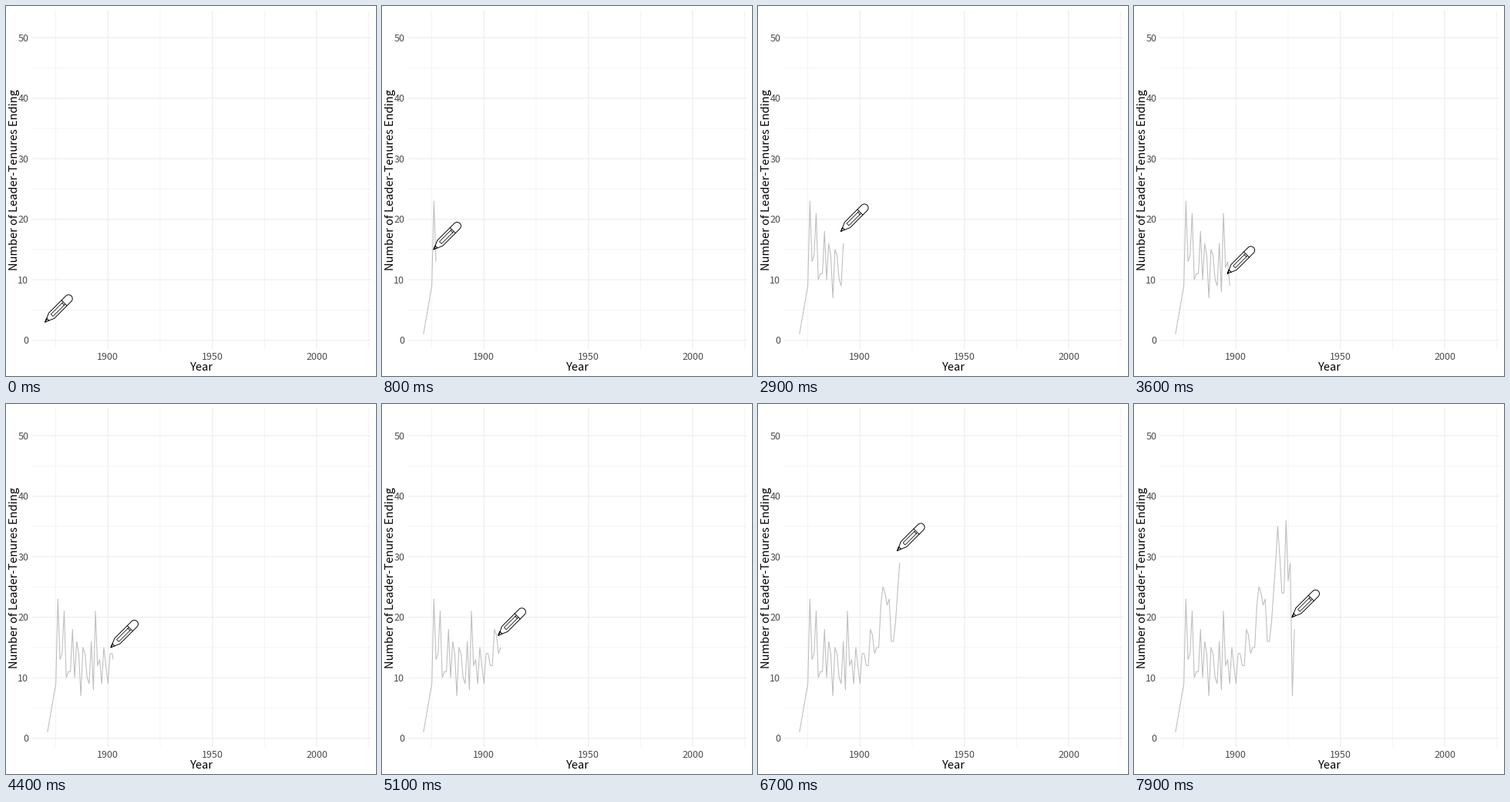
A matplotlib script for the animation above (8000 ms loop, 480 by 480 pixels).

```python
import numpy as np
import matplotlib.pyplot as plt
from matplotlib.animation import FuncAnimation
from matplotlib.path import Path
from matplotlib.patches import PathPatch
from matplotlib.transforms import Affine2D

plt.rcParams["font.family"] = "Noto Sans CJK JP"
plt.rcParams["path.snap"] = False

SIZE, DPI = 480, 100
PX = 72 / DPI  # points per pixel
FRAMES, INTERVAL = 80, 100
LEFT, RIGHT, TOP, BOTTOM = 34.5, 474.5, 5.5, 445.5

years = np.r_[1871, np.arange(1875, 1930)]
counts = np.array([
    1, 9, 23, 13, 14, 21, 10, 11, 11, 18, 10, 16, 14, 7, 15, 14, 10, 9, 16,
    8, 21, 12, 13, 9, 15, 12, 9, 14, 14, 12, 12, 18, 17, 14, 15, 15, 22, 25,
    24, 22, 23, 16, 16, 19, 24, 29, 35, 30, 24, 24, 36, 26, 29, 7, 18, 18])


def sx(year):
    return 132.3 + 2.707 * (year - 1900)


def sy(count):
    return 433.6 - 7.85 * count


# Every data point lands on a whole frame; 1871-2014 spans 199 steps.
keys = np.round((years - 1871) * 199 / 143)
px, py = sx(years), sy(counts)

fig = plt.figure(figsize=(SIZE / DPI, SIZE / DPI), dpi=DPI, facecolor="white")
ax = fig.add_axes([0, 0, 1, 1])
ax.set_xlim(0, SIZE)
ax.set_ylim(SIZE, 0)
ax.axis("off")


def rule(xs, ys, width):
    ax.plot(xs, ys, color="#EBEBEB", lw=width * PX,
            solid_capstyle="butt", zorder=1)


def label(x, y, text, size, color, **kw):
    ax.text(x, y, text, fontsize=size * PX, color=color, va="baseline",
            rotation_mode="anchor", zorder=2, **kw)


for year in range(1875, 2026, 25):
    major = year % 50 == 0
    rule([sx(year)] * 2, [TOP, BOTTOM], 1.07 if major else 0.53)
    if major:
        label(sx(year), 459, str(year), 12.5, "#4D4D4D", ha="center")

for count in range(0, 51, 5):
    major = count % 10 == 0
    rule([LEFT, RIGHT], [sy(count)] * 2, 1.07 if major else 0.53)
    if major:
        label(29.3, sy(count) + 4.5, str(count), 12.5, "#4D4D4D", ha="right")

label(254, 472.8, "Year", 14.6, "black", ha="center")
label(15.3, 225, "Number of Leader-Tenures Ending", 14.6, "black",
      ha="center", rotation=90)

trace, = ax.plot([], [], color="#BEBEBE", lw=1.07 * PX, zorder=3,
                 solid_capstyle="butt", solid_joinstyle="round")

# Pencil in its own frame: tip at the origin, axis along +x.
M, L, C = Path.MOVETO, Path.LINETO, Path.CURVE4
W, END = 5.0, 48.0
R = W * 0.55


def strokes(*lines):
    verts = [p for line in lines for p in line]
    codes = [c for line in lines for c in [M] + [L] * (len(line) - 1)]
    return Path(verts, codes)


outline = Path(
    [(4.8, -2), (11.7, -W), (END - W, -W),
     (END - W + R, -W), (END, -R), (END, 0),
     (END, R), (END - W + R, W), (END - W, W),
     (11.7, W), (4.8, 2)],
    [M, L, L, C, C, C, C, C, C, L, L])
lead = strokes([(0, 0), (4.8, -2), (4.8, 2), (0, 0), (4.8, -2)])
ferrule = strokes([(35, -W), (35, W)])
grooves = strokes([(34, -1.9), (12.5, -1.9), (12.5, 1.9), (34, 1.9)],
                  [(33, -1.9), (33, 1.9)])

parts = []
for path, width in ((outline, 0.95), (lead, 1.05), (ferrule, 0.95),
                    (grooves, 0.75)):
    part = PathPatch(path, fill=False, ec="black", lw=width * PX,
                     joinstyle="round", capstyle="round", zorder=4)
    ax.add_patch(part)
    parts.append(part)


def update(i):
    x, y = np.interp(i, keys, px), np.interp(i, keys, py)
    past = keys < i
    trace.set_data(np.r_[px[past], x], np.r_[py[past], y])
    move = Affine2D().rotate_deg(-45).translate(x - 3.0, y - 15.7)
    for part in parts:
        part.set_transform(move + ax.transData)
    return [trace, *parts]


anim = FuncAnimation(fig, update, frames=FRAMES, interval=INTERVAL,
                     repeat=True, repeat_delay=0, blit=False)
plt.show()
```
